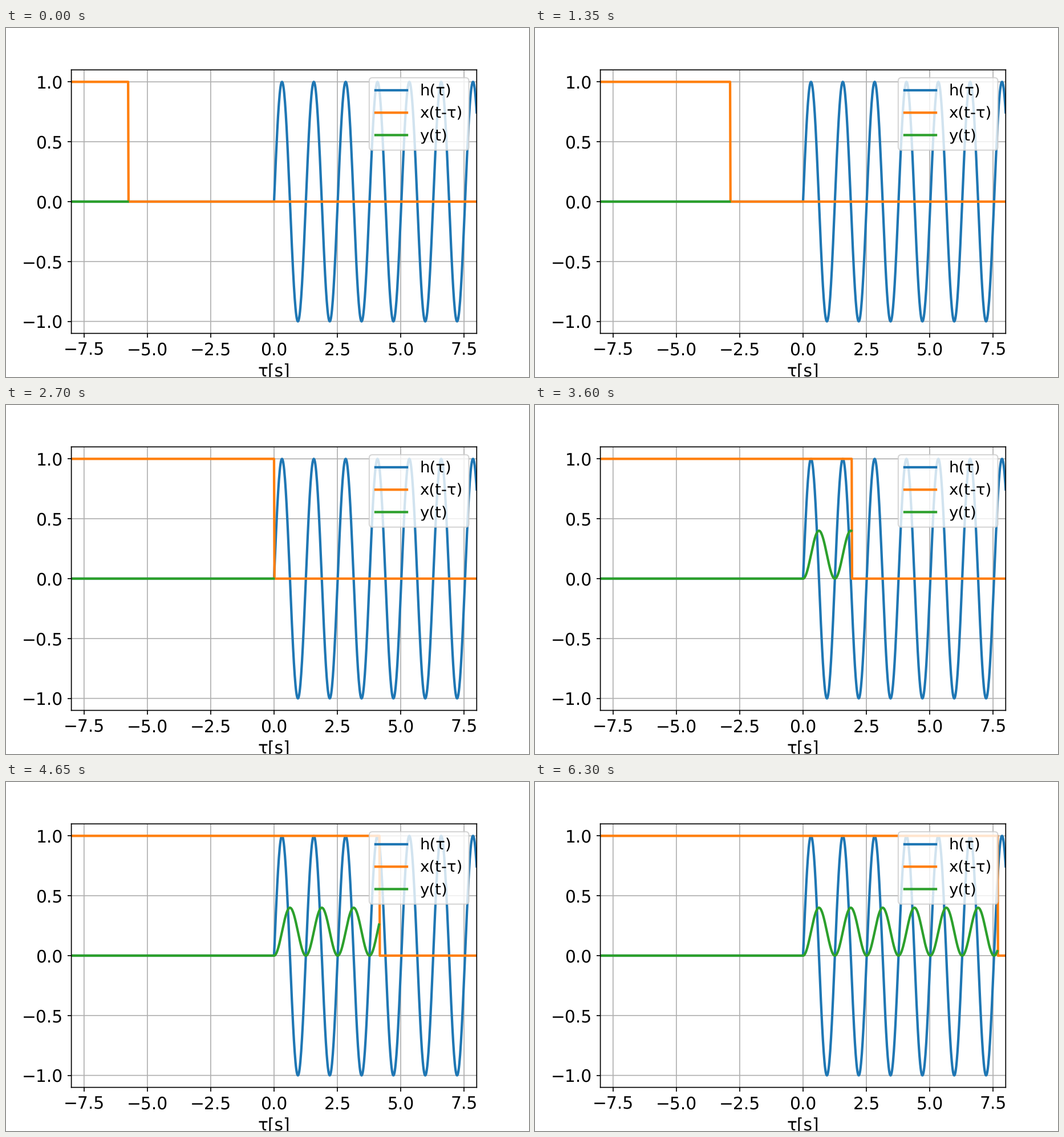
Recreate the animation shown at these times as a matplotlib script. Size 917 by 611 pixels, loop 6450 ms.

```python
import matplotlib.pyplot as plt
import numpy as np
from matplotlib.animation import FuncAnimation

WIDTH, HEIGHT, DPI = 917, 611, 152.8
FRAMES, INTERVAL = 43, 150
STEP = 0.016          # sample spacing in seconds
FIRST, STRIDE = 140, 20   # edge sample at the start, samples moved per frame
OMEGA = 5

plt.rcParams.update({
    "font.family": "DejaVu Sans",
    "font.size": 14,
    "legend.fontsize": 13,
    "lines.linewidth": 2,
    "path.snap": False,
    "text.hinting": "none",
})

tau = -8 + STEP * np.arange(1001)
active = np.maximum(tau, 0)
response = np.sin(OMEGA * active)
output = (1 - np.cos(OMEGA * active)) / OMEGA

eps = 1e-6  # keeps the pixel size from being truncated
fig = plt.figure(figsize=((WIDTH + eps) / DPI, (HEIGHT + eps) / DPI), dpi=DPI)
fig.subplots_adjust(left=0.125, right=0.9, bottom=0.125, top=0.88)
ax = fig.add_subplot()
ax.set(xlim=(-8, 8), ylim=(-1.1, 1.1), xlabel="τ[s]")
ax.set_xticks(np.arange(-7.5, 8, 2.5))
ax.set_yticks(np.arange(-1, 1.1, 0.5))
ax.grid(True)

ax.plot(tau, response, color="C0", label="h(τ)")
step_line, = ax.plot([], [], color="C1", label="x(t-τ)")
output_line, = ax.plot([], [], color="C2", label="y(t)")
ax.legend(loc="upper right", labelspacing=0.475)


def update(frame):
    edge = FIRST + STRIDE * frame
    step_line.set_data(tau, np.where(np.arange(tau.size) <= edge, 1.0, 0.0))
    output_line.set_data(tau[:edge], output[:edge])
    return step_line, output_line


anim = FuncAnimation(fig, update, frames=FRAMES, interval=INTERVAL,
                     init_func=lambda: update(0), repeat=True, repeat_delay=0)
plt.show()
```
